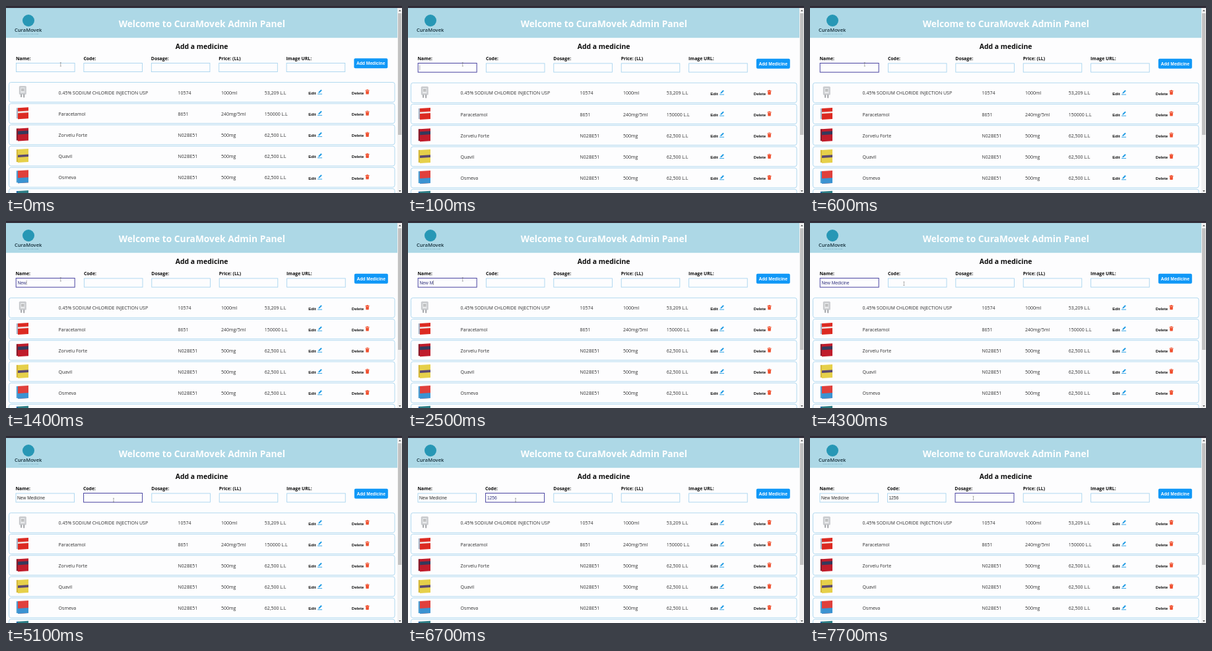
Write an HTML page that moves like this. It is 600 by 283 pixels and loops after 8000 ms.

```html
<!DOCTYPE html>
<html lang="en">
<head>
<meta charset="utf-8">
<style>
  html, body { margin: 0; width: 100%; height: 100%; overflow: hidden; background: #fdfdfe; }
  svg { display: block; width: 600px; height: 283px; }
  text { font-family: "Open Sans", sans-serif; font-size: 7px; fill: #303030; white-space: pre; }
  .bold { font-weight: 700; fill: #0c0c0c; }
  .ui { font: 6.7px "Liberation Sans", Arial, sans-serif; }
  .action { font-size: 6.1px; font-weight: 700; fill: #111; }
  .box { fill: #fdfdfe; stroke: #a3d2ee; stroke-width: .85; }
</style>
</head>
<body>
<svg id="stage" viewBox="0 0 600 283"></svg>
<script>
const LOOP = 8000;
const stage = document.getElementById('stage');

const text = (x, y, s, cls = '', extra = '') =>
  `<text x="${x}" y="${y}" class="${cls}" ${extra}>${s}</text>`;
const rect = (x, y, w, h, fill, extra = '') =>
  `<rect x="${x}" y="${y}" width="${w}" height="${h}" fill="${fill}" ${extra}/>`;

const FIELD_X = 15, FIELD_STEP = 102.4;
const labels = ['Name:', 'Code:', 'Dosage:', 'Price: (LL)', 'Image URL:'];

const medicines = [
  ['0.45% SODIUM CHLORIDE INJECTION USP', '10574', '1000ml', '53,209 L.L'],
  ['Paracetamol', '8651', '240mg/5ml', '150000 L.L'],
  ['Zorvelu Forte', 'N02BE51', '500mg', '62,500 L.L'],
  ['Quavil', 'N02BE51', '500mg', '62,500 L.L'],
  ['Osmeva', 'N02BE51', '500mg', '62,500 L.L'],
  ['', '', '', '']
];
// Top, height, front, side and band colours, band start and end as fractions
const packs = [
  null,
  [5.5, 18, '#dc2a22', '#a9b6c8', '#f1e4e2', .3, .5],
  [4.5, 20, '#c01c2b', '#8a1c2c', '#343a5c', .2, .5],
  [4, 21, '#e6d04a', '#d6b93c', '#5b4a72', .4, .62],
  [4, 20, '#e0403c', '#4a9fd4', '#3b93d2', .55, 1],
  [2.5, 20, '#2f7f86', '#2468a8', '#dfe9ee', .4, .6]
];

function pack(i) {
  if (!packs[i]) return rect(19.8, 5.5, 11, 13, '#c9cbce', 'rx="1.5"') +
    rect(22, 8, 6.5, 8, '#e6e7e9') + rect(23, 10, 4.5, .8, '#888') +
    rect(23, 12, 4.5, .8, '#888') + rect(22.3, 18, 1.5, 4.5, '#8b8d92') + rect(26.5, 18, 1.5, 5, '#8b8d92');
  const [top, height, front, side, band, from, to] = packs[i];
  const slab = (a, b, fill) =>
    `<path d="M18 ${top + 1 + a * height}L34 ${top + a * height}V${top - 1 + b * height}L18 ${top + b * height}Z" fill="${fill}"/>`;
  return rect(15.8, top + 1, 3, height - 2, side) + slab(0, 1, front) + slab(from, to, band);
}

const pencil = `<path d="M473.200 16.300L473.700 14.600L477.300 11L478.800 12.300L475.300 15.800Z" fill="#1e9be4"/>
  <path d="M472 17.700H479" stroke="#1e9be4" stroke-width=".9"/>`;
const bin = rect(544.5, 11.7, 6, 1.2, '#f0502f') + rect(546.3, 10.8, 2.4, 1, '#f0502f') +
  `<path d="M545 13.200H550L549.600 18H545.400Z" fill="#f0502f"/>`;

function row([name, code, dose, price], i) {
  return `<g transform="translate(0 ${115.5 + i * 32.2})">
    <rect class="box" x="4.500" y="0" width="584.500" height="30" rx="3"/>${pack(i)}` +
    text(79.6, 18, name) + text(260.6, 18, code) + text(326, 18, dose) + text(391.7, 18, price) +
    text(458.2, 18.3, 'Edit', 'ui action') + pencil +
    text(523.8, 18.3, 'Delete', 'ui action') + bin + '</g>';
}

function field(label, i) {
  const x = FIELD_X + i * FIELD_STEP;
  return `<g class="field">${text(x, 81.6, label, 'bold', 'style="font-size:6.9px"')}
    <rect class="box" x="${x + .5}" y="86.400" width="88.600" height="13.200"/>
    ${text(x + 2.5, 95.2, '', 'ui')}</g>`;
}

stage.innerHTML =
  rect(0, 0, 600, 3, '#302c37') + rect(0, 3, 593, 45.2, '#add8e6') +
  '<circle cx="34" cy="22" r="9" fill="#2797b5"/>' +
  text(33.7, 39, 'CuraMovek', 'bold', 'text-anchor="middle" style="font-size:7.6px;font-weight:600;fill:#16303c"') +
  text(34, 42.7, 'YOUR HEALTH OUR CARE', '', 'text-anchor="middle" style="font-size:2.1px;letter-spacing:.3px;fill:#3d7f96"') +
  text(296.8, 32, 'Welcome to CuraMovek Admin Panel', 'bold', 'text-anchor="middle" style="font-size:13.75px;fill:#fff"') +
  text(296.6, 64.6, 'Add a medicine', 'bold', 'text-anchor="middle" style="font-size:10.4px"') +
  labels.map(field).join('') +
  '<g id="button">' + rect(527.3, 79.3, 51, 15, '#1098f7', 'rx="2"') +
  text(552.7, 89.2, 'Add Medicine', 'ui', 'text-anchor="middle" style="font-weight:700;fill:#fff"') + '</g>' +
  '<g id="rows">' + medicines.map(row).join('') + '</g>' +
  rect(593, 3, 7, 280, '#f1f1f1') + rect(594, 11, 5.3, 184, '#c1c1c1') +
  '<path d="M595 8L596.800 5.800L598.600 8ZM595 279L596.800 281.200L598.600 279Z" fill="#555"/>' +
  '<path id="caret" d="M0 89.700V97" stroke="#666" stroke-width=".5"/>' +
  '<path id="mouse" d="M-1 -2.700H1M0 -2.700V2.700M-1 2.700H1" fill="none" stroke="#666" stroke-width=".5"/>';

const [button, rows, caret, mouse] = ['button', 'rows', 'caret', 'mouse'].map(id => document.getElementById(id));
const fields = [...document.querySelectorAll('.field')].map(g => {
  const [, input] = g.querySelectorAll('text');
  return { g, input, frame: g.querySelector('rect') };
});

const shift = (el, x, y) => el.setAttribute('transform', `translate(${x} ${y})`);
const setAll = (el, attrs) => Object.entries(attrs).forEach(([k, v]) => el.setAttribute(k, v));

// Each entry: time, focused field, number of characters in it
const keys = [
  [100, 0, 0], [1100, 0, 1], [1200, 0, 2], [1300, 0, 3], [1500, 0, 4], [2200, 0, 5],
  [3000, 0, 6], [3100, 0, 7], [3200, 0, 9], [3300, 0, 10], [3400, 0, 12],
  [4600, 1, 0], [5700, 1, 1], [5800, 1, 2], [5900, 1, 3], [6200, 1, 4],
  [7200, 2, 0]
];
const values = ['New Medicine', '1256', ''];

const ease = (t, a, b) => {
  const p = Math.min(1, Math.max(0, (t - a) / (b - a)));
  return p * p * (3 - 2 * p);
};

function render(t) {
  const [time, focus, count] = keys.filter(k => k[0] <= t).pop() || [0, -1, 0];
  const active = focus >= 0, push = active ? .5 : 0;

  // The focused box has a thicker border, which pushes its neighbours apart
  fields.forEach(({ g, input, frame }, i) => {
    const on = i === focus, x = FIELD_X + i * FIELD_STEP;
    shift(g, i <= focus ? -push : push, on ? 0 : push);
    setAll(frame, on
      ? { x: x + .7, y: 86.5, width: 89, height: 13.7, style: 'stroke:#4a45a2;stroke-width:1' }
      : { x: x + .5, y: 86.4, width: 88.6, height: 13.2, style: '' });
    setAll(input, { x: x + (on ? 3 : 2.5), y: on ? 95.7 : 95.2, style: on ? 'fill:#33337f' : '' });
    input.textContent = on ? values[i].slice(0, count) : i < focus ? values[i] : '';
  });
  shift(button, push, push);
  shift(rows, 0, push * 1.6);

  const blinkOn = active && (t - time) % 1000 < 500;
  caret.setAttribute('visibility', blinkOn ? 'visible' : 'hidden');
  if (active) shift(caret, FIELD_X + focus * FIELD_STEP + 2.8 + fields[focus].input.getComputedTextLength(), 0);

  const first = ease(t, 3900, 4500), second = ease(t, 6700, 6900);
  shift(mouse, 82.8 + 80.2 * first + 84.5 * second, 88.4 + 8.6 * first - 3 * second);
}

const start = performance.now();
function tick() {
  render((performance.now() - start) % LOOP);
  requestAnimationFrame(tick);
}
tick();
</script>
</body>
</html>
```
